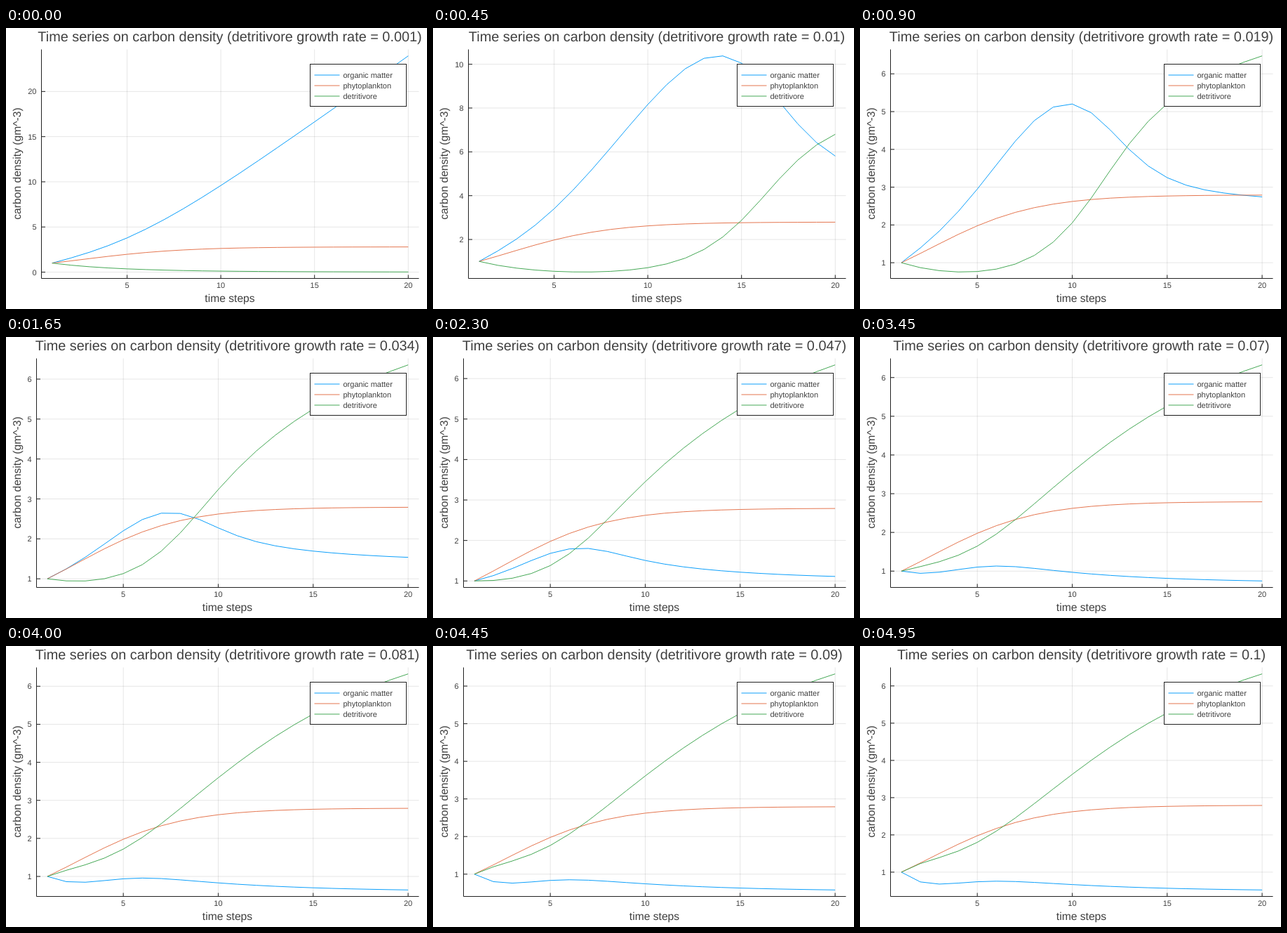
These frames come from a looping animation (600 px wide and 400 px high, 5000 ms). An HTML page:

```html
<!DOCTYPE html>
<html lang="en">
<head>
<meta charset="utf-8">
<title>Carbon density</title>
<style>
  html, body { margin: 0; width: 100%; height: 100%; overflow: hidden; background: #fff; }
  svg { display: block; width: 600px; height: 400px; }
  text { font-family: "Liberation Sans", Arial, sans-serif; fill: #404040; text-rendering: geometricPrecision; }
  .tick { font-size: 11px; }
  .label { font-size: 15.65px; text-anchor: middle; }
  .title { font-size: 19.88px; text-anchor: middle; }
  .grid { stroke: #000; stroke-opacity: .1; }
  .axis { stroke: #222; fill: none; }
  .curve { fill: none; stroke-width: .95; stroke-linejoin: round; }
</style>
</head>
<body>
<svg id="stage" viewBox="0 0 600 400"></svg>
<script>
const COUNT = 100, STEP_MS = 50;
const TOP = 30.5, BOTTOM = 356.5, RIGHT = 588.5;
const SERIES = [
  ["organic matter", "#009afa"],
  ["phytoplankton", "#e36f47"],
  ["detritivore", "#3da44d"]
];

// Carbon flow between organic matter, phytoplankton and detritivore
function flow([o, p, d], rate) {
  const death = 0.159 * p + 0.1313 * p * p;
  return [
    death + 0.267 * d - 9.58 * rate * o * d,
    0.526 * p - death,
    5.6 * rate * o * d - 0.267 * d
  ];
}

function advance(s, rate, h) {
  const shift = (k, f) => s.map((v, i) => v + k[i] * f);
  const a = flow(s, rate);
  const b = flow(shift(a, h / 2), rate);
  const c = flow(shift(b, h / 2), rate);
  const d = flow(shift(c, h), rate);
  return s.map((v, i) => v + h * (a[i] + 2 * b[i] + 2 * c[i] + d[i]) / 6);
}

function simulate(rate) {
  let s = [1, 1, 1];
  const states = [s];
  for (let t = 2; t <= 20; t++) {
    for (let n = 0; n < 20; n++) s = advance(s, rate, 1 / 20);
    states.push(s);
  }
  return states;
}

// Choose the step that best balances count, coverage and roundness
function pickTicks(lo, hi) {
  const choices = [[10, 1], [5, .9], [2, .7], [2.5, .5], [3, .2], [1, 1]];
  let best = -1, result = [];
  for (const [step, nice] of choices) {
    const first = Math.ceil(lo / step), n = Math.floor(hi / step) - first + 1;
    if (n < 4 || n > 8) continue;
    const even = 1 - Math.abs(n - 5) / 5;
    const cover = 1.5 * (hi - lo) / ((n - 1) * step);
    const score = even / 4 + (first <= 0 ? 1 / 6 : 0) + cover / 3 + nice / 4;
    if (score > best + 1e-9) {
      best = score;
      const digits = step % 1 ? 1 : 0;
      result = Array.from({ length: n }, (_, i) => {
        const value = (first + i) * step;
        return { value, text: value.toFixed(digits) };
      });
    }
  }
  return result;
}

function textWidth(s) {
  return [...s].reduce((w, ch) => w + (ch === "." ? 3.06 : 6.12), 0);
}

const line = (cls, x1, y1, x2, y2) =>
  `<line class="${cls}" x1="${x1}" y1="${y1}" x2="${x2}" y2="${y2}"/>`;
const label = (cls, x, y, s, extra = "") =>
  `<text class="${cls}" x="${x}" y="${y}" ${extra}>${s}</text>`;

const legend = `<rect class="axis" x="433.5" y="51.5" width="137" height="60" style="fill:#fff"/>` +
  SERIES.map(([name, color], i) => {
    const y = 67 + 15 * i;
    return `<path class="curve" stroke="${color}" d="M439.5 ${y}H475.5"/>` +
      label("tick", 480.5, y + 4, name);
  }).join("");

function drawChart(index) {
  const rate = (index + 1) / 1000;
  const states = simulate(rate), all = states.flat();
  const min = Math.min(...all), max = Math.max(...all), pad = (max - min) * .03;
  const lo = min - pad, hi = max + pad;
  const ticks = pickTicks(lo, hi);
  const widest = Math.max(...ticks.map(t => textWidth(t.text)));
  const left = Math.round(43 + (widest - 6.12) * 1.14) + .5;
  const mid = (left + RIGHT) / 2 - .5;
  const px = t => left + (t - .43) / 20.14 * (RIGHT - left);
  const py = v => BOTTOM - (v - lo) / (hi - lo) * (BOTTOM - TOP);

  let grid = "", marks = "", curves = "";
  for (const t of [5, 10, 15, 20]) {
    const x = px(t).toFixed(2);
    grid += line("grid", x, TOP, x, BOTTOM);
    marks += line("axis", x, BOTTOM, x, BOTTOM - 5) +
      label("tick", x, 370, t, 'text-anchor="middle"');
  }
  for (const t of ticks) {
    const y = py(t.value);
    grid += line("grid", left, y, RIGHT, y);
    marks += line("axis", left, y, left + 5.5, y) +
      label("tick", left - 7, y + 4, t.text, 'text-anchor="end"');
  }
  SERIES.forEach(([, color], k) => {
    const points = states.map((s, i) => px(i + 1).toFixed(2) + "," + py(s[k]).toFixed(2));
    curves += `<polyline class="curve" stroke="${color}" points="${points.join(" ")}"/>`;
  });

  return grid + `<path class="axis" d="M${left} ${TOP}V${BOTTOM}H${RIGHT}"/>` + marks + curves + legend +
    label("title", mid, 19, `Time series on carbon density (detritivore growth rate = ${rate})`) +
    label("label", mid, 389.5, "time steps") +
    label("label", 0, 0, "carbon density (gm^-3)", 'transform="translate(21 193) rotate(-90)"');
}

const stage = document.getElementById("stage");
const charts = Array.from({ length: COUNT }, (_, i) => drawChart(i));
const start = performance.now();
let shown = -1;

function render(now) {
  const index = Math.floor(Math.max(0, now - start) / STEP_MS) % COUNT;
  if (index !== shown) {
    shown = index;
    stage.innerHTML = charts[index];
  }
  requestAnimationFrame(render);
}
render(start);
</script>
</body>
</html>
```
